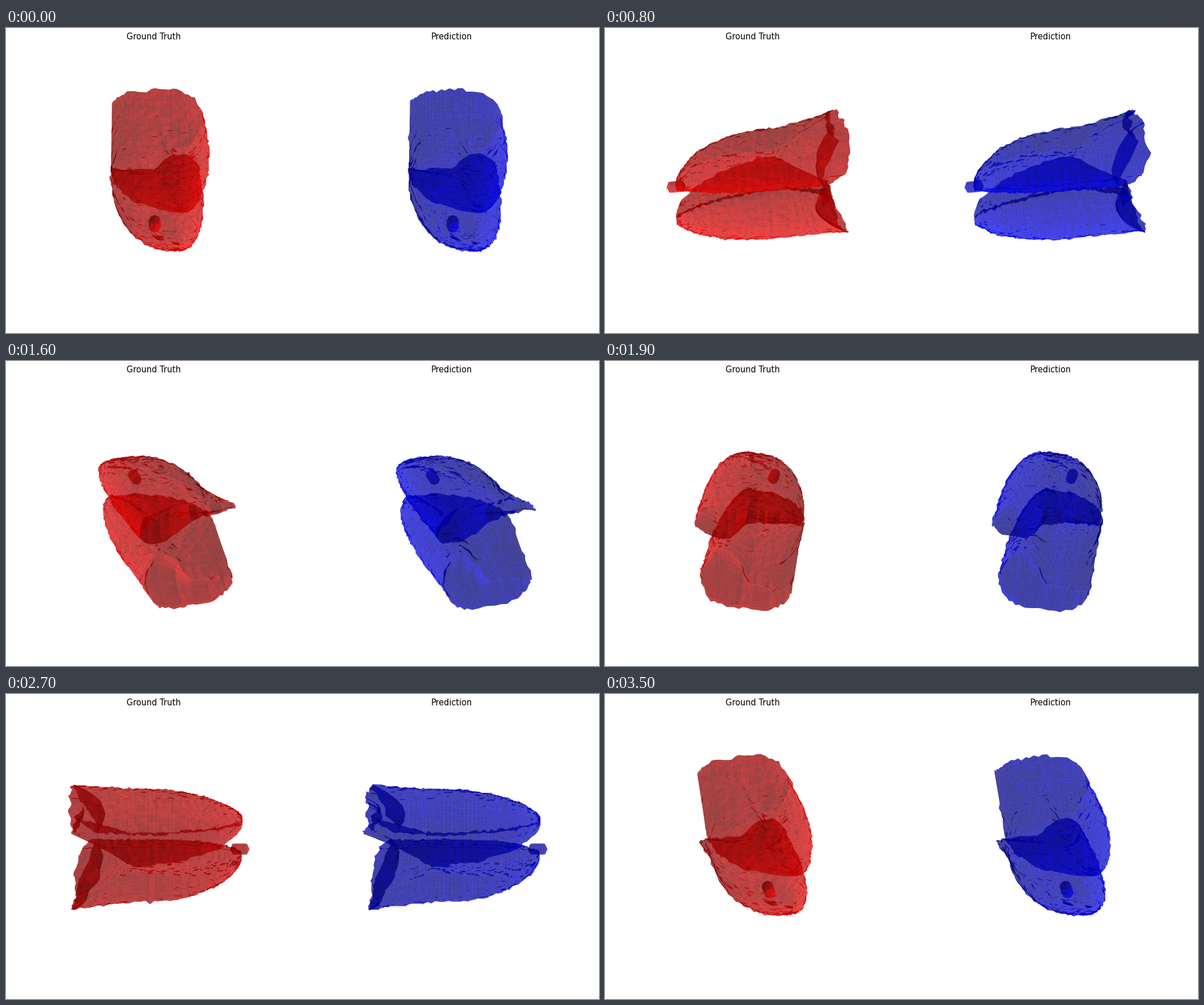
Recreate the animation shown at these times as a matplotlib script. Size 1043 by 537 pixels, loop 3.6 s.

```python
import numpy as np
import matplotlib.pyplot as plt
from matplotlib.animation import FuncAnimation
from matplotlib.collections import PolyCollection

W, H, DPI = 1043, 537, 64
FRAMES, STEP = 36, 100
CX, CY, SHIFT = 268, 270, 524
ELEV, DIST = np.radians(30), 2820
LIGHT = np.array([-2, -2, 1]) / 3
BASE, TIP = -153, 149

# Heights are measured away from the slit between the two lobes.
UPPER = dict(side=1, recess=55, right=89, tip_y=48, tip_z=32, top=89, flare=15,
             rim=10, rim_base=68, rim_slope=0.08, back=28, back_rise=20)
LOWER = dict(side=-1, recess=45, right=80, tip_y=42, tip_z=45, top=95, flare=6,
             rim=-3, rim_base=65, rim_slope=0.2, back=38, back_rise=8)


def snap(a, step):
    return np.round(a / step) * step


def quads(x, y, z, outward):
    """Split a grid into quads and return them with outward unit normals."""
    p = np.stack([x, y, z], axis=-1)
    q = np.stack([p[:-1, :-1], p[1:, :-1], p[1:, 1:], p[:-1, 1:]], axis=2)
    q = q.reshape(-1, 4, 3)
    n = np.cross(q[:, 2] - q[:, 0], q[:, 3] - q[:, 1])
    size = np.linalg.norm(n, axis=1)
    keep = size > 0.5
    q, n = q[keep], n[keep] / size[keep, None]
    ref = q.mean(axis=1) - q.mean(axis=(0, 1)) if outward is None else outward
    return q, n * np.sign(np.sum(n * ref))


def lobe(rng, side, recess, right, tip_y, tip_z, top, flare,
         rim, rim_base, rim_slope, back, back_rise, nx=46, ns=34):
    t = np.linspace(0, 1, nx)[:, None]
    x = BASE + (TIP - BASE) * (1 - (1 - t) ** 1.2)
    s = np.sin(np.linspace(-np.pi / 2, np.pi / 2, ns))
    near = np.clip((-40 - x) / 115, 0, 1)
    front = np.clip((x + 40) / 190, 0, 1)
    taper = (1 - front ** 2.4) ** 0.55

    lo = tip_y - (tip_y + 84) * taper
    hi = tip_y + (right - tip_y) * taper - 6 * near
    y = (lo + hi) / 2 + (hi - lo) / 2 * s

    # Domed outer sheet, and an inner sheet that sags towards the slit.
    crest = tip_z + (top - tip_z) * taper ** 1.4 + flare * near
    crest = crest + 6 * s * (1 - near) * taper
    z_lo = rim + rim_base * near ** 1.3 + rim_slope * np.maximum(x + 40, 0)
    z_hi = back + back_rise * taper
    edge = z_lo + (z_hi - z_lo) * (1 + s) / 2
    bulge = 1 - np.abs(s) ** 3
    out = edge + (crest - edge) * bulge ** 0.6
    sag = (z_lo * 0.25 + z_hi * 0.75 - 8) * taper
    med = edge - sag * np.maximum(0, 1 - (2 * s - 1) ** 2)

    # Voxel-like terraces and a ragged rim.
    out = snap(out + rng.normal(0, 1.1, out.shape) * bulge, 5)
    med = snap(med + rng.normal(0, 1.3, med.shape) * bulge, 5)
    y = snap(y + rng.normal(0, 1, (nx, 1)), 3)
    ragged = np.convolve(rng.normal(0, 5, ns), np.ones(3) / 3, "same")

    def place(z):
        return x + near * recess * (1 - np.abs(z) / 110) ** 2 + ragged * near ** 4

    xo, xm = place(out), place(med)
    parts = [quads(xo, y, side * out, [0, 0, side]),
             quads(xm, y, side * med, [0, 0, -side])]
    v = np.linspace(0, 1, 7)[:, None]
    for i, depth, way in ((0, 30, -1), (-1, 0, 1)):
        hollow = depth * 4 * v * (1 - v) * np.clip((out[i] - med[i]) / 60, 0, 1)
        parts.append(quads(xo[i] * (1 - v) + xm[i] * v + hollow,
                           np.repeat(y[i][None], len(v), axis=0),
                           side * (out[i] * (1 - v) + med[i] * v),
                           [way, 0, 0]))
    return parts


def stub():
    """Short tube between the two apexes."""
    a = np.linspace(0, 2 * np.pi, 9)
    t = np.linspace(-1, 1, 9)[:, None]
    r = 10 * (1 - t ** 8) ** 0.5
    return quads(143 + 17 * t + 0 * a, -6 + r * np.cos(a), r * np.sin(a), None)


def model(seed, color):
    rng = np.random.default_rng(seed)
    parts = lobe(rng, **UPPER) + lobe(rng, **LOWER) + [stub()]
    faces = np.concatenate([p[0] for p in parts])
    normals = np.concatenate([p[1] for p in parts])
    shade = 0.65 - 0.35 * normals @ LIGHT
    rgba = np.full((len(faces), 4), 0.5)
    rgba[:, :3] = shade[:, None] * np.array(color)
    return faces, rgba


def project(faces, azim, cx):
    c, s = np.cos(azim), np.sin(azim)
    x, y, z = np.moveaxis(faces, -1, 0)
    toward, across = c * x + s * y, c * y - s * x
    depth = toward * np.cos(ELEV) + z * np.sin(ELEV)
    up = z * np.cos(ELEV) - toward * np.sin(ELEV)
    k = DIST / (DIST - depth)
    return np.stack([cx + k * across, CY - k * up], axis=-1), depth.mean(axis=1)


fig = plt.figure(figsize=(W / DPI, H / DPI), dpi=DPI, facecolor="white")
ax = fig.add_axes([0, 0, 1, 1])
ax.set(xlim=(0, W), ylim=(H, 0))
ax.axis("off")

panels = []
for i, (title, color) in enumerate([("Ground Truth", (1, 0, 0)),
                                    ("Prediction", (0, 0, 1))]):
    ax.text(260 + SHIFT * i, 20, title, ha="center", va="baseline",
            family="DejaVu Sans", size=14.5 * 72 / DPI, color="black")
    mesh = PolyCollection([], edgecolors="none", linewidths=0)
    ax.add_collection(mesh, autolim=False)
    panels.append((mesh, CX + SHIFT * i, *model(3 + i, color)))


def draw(frame):
    azim = 2 * np.pi * frame / FRAMES
    for mesh, cx, faces, rgba in panels:
        xy, depth = project(faces, azim, cx)
        order = np.argsort(depth)
        mesh.set_verts(xy[order])
        mesh.set_facecolor(rgba[order])
    return [p[0] for p in panels]


anim = FuncAnimation(fig, draw, frames=FRAMES, interval=STEP,
                     repeat=True, repeat_delay=0, blit=False)
plt.show()
```
